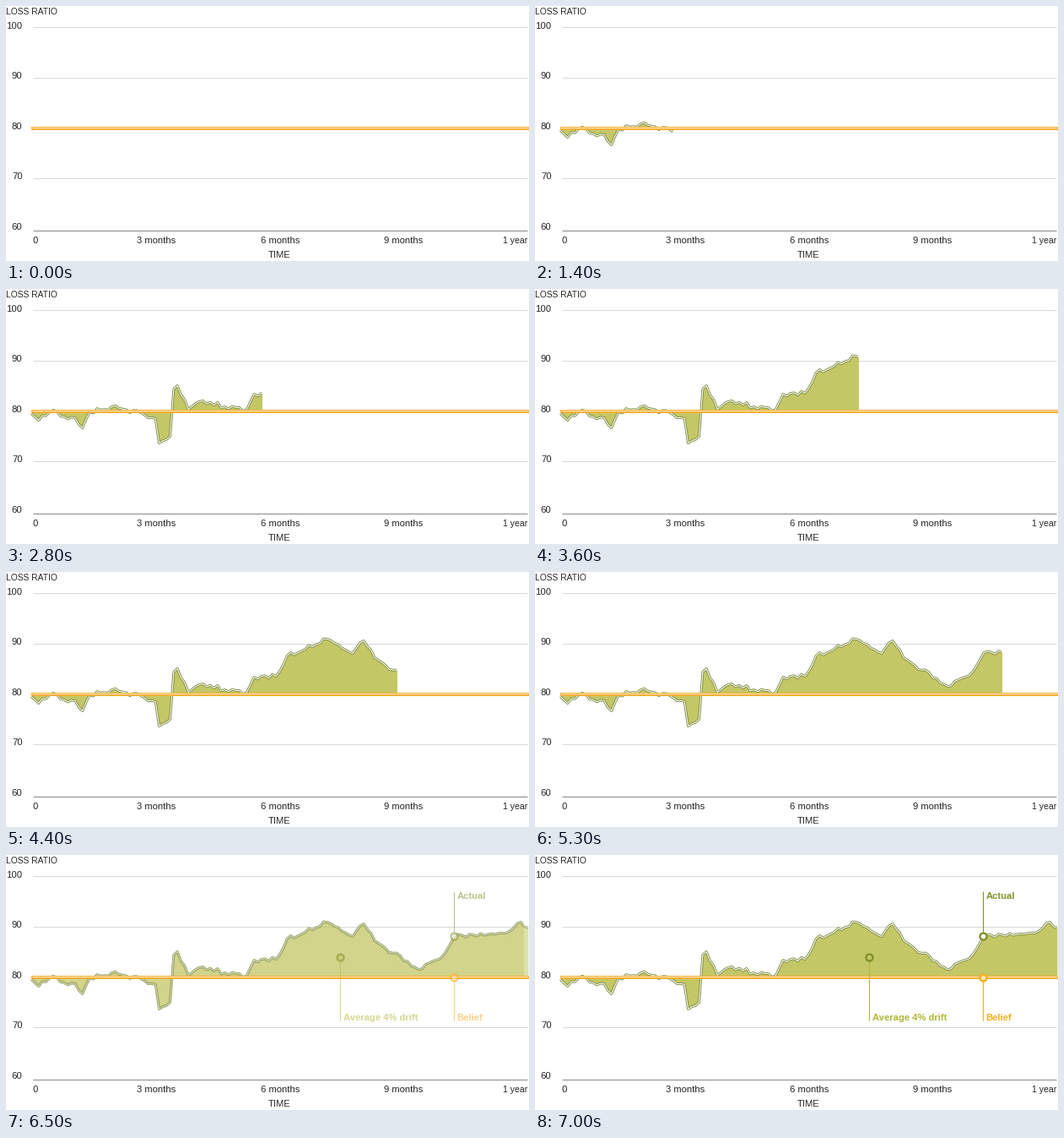
These frames come from a looping animation (620x302 px, 8 s). A matplotlib script:

```python
import numpy as np
import matplotlib.pyplot as plt
from matplotlib.animation import FuncAnimation
from matplotlib.patches import Rectangle

W, H, DPI = 620, 302, 100
PT = 72 / DPI  # points per pixel
FRAMES, STEP_MS = 80, 100
SWEEP_END, FADE_END = 59, 70
BASE_Y = 145

INK, GRID, AXIS = "#262626", "#d9d9d9", "#999999"
FILL, OUTLINE = "#c4c765", "#7a8838"
OLIVE, LIME, ORANGE = "#82922b", "#b1b837", "#f9ac1f"
GOLD, PALE = "#f6b03a", "#fde6b8"

# Main turns of the curve as (sample, height); seeded jitter roughens the rest
SAMPLES = 137
TURNS = [
    (0, 147), (2, 155), (6, 143), (8, 150), (12, 152), (14, 164), (16, 145),
    (22, 139), (30, 146), (34, 153), (35, 182), (38, 174), (39, 118),
    (40, 114), (43, 142), (47, 132), (53, 139), (59, 142), (61, 124),
    (67, 123), (70, 99), (74, 93), (81, 79), (88, 96), (91, 81), (94, 101),
    (106, 135), (112, 122), (116, 95), (129, 92), (134, 79), (136, 86),
]


def make_curve():
    rng = np.random.default_rng(4)
    turn_at, turn_y = np.transpose(TURNS)
    k = np.arange(SAMPLES)
    jitter = rng.uniform(-3, 3, SAMPLES)
    jitter[turn_at] = 0
    return 30 + 4.33 * k, np.interp(k, turn_at, turn_y) + jitter + 0.5


CURVE_X, CURVE_Y = make_curve()

plt.rcParams["font.family"] = "Liberation Sans"
fig = plt.figure(figsize=(W / DPI, H / DPI), dpi=DPI, facecolor="white")
ax = fig.add_axes([0, 0, 1, 1])
ax.set_xlim(0, W)
ax.set_ylim(H, 0)
ax.axis("off")


def line(xs, ys, color, width, z):
    return ax.plot(xs, ys, color=color, lw=width * PT, zorder=z,
                   solid_capstyle="butt")[0]


def label(x, y, text, size=11.2, color=INK, ha="left", weight="normal"):
    return ax.text(x, y, text, fontsize=size * PT, color=color, ha=ha,
                   va="baseline", weight=weight, zorder=8)


def draw_axes():
    label(0.5, 10, "LOSS RATIO", 10.2)
    for i in range(5):
        label(19.6, 26.6 + 59.6 * i, str(100 - 10 * i), ha="right")
        if i < 4:
            y = 25 + 59.7 * i
            line([32, 618], [y, y], GRID, 1, 1)
    line([32, 618], [266, 266], AXIS, 1.3, 1)
    label(32, 281, "0")
    for i in range(3):
        label(155 + 146.7 * i, 281, f"{3 * (i + 1)} months", 11.3)
    label(618.8, 281, "1 year", 10.5, ha="right")
    label(311, 298, "TIME")


def draw_belief():
    line([30, 620], [BASE_Y, BASE_Y], GOLD, 4, 5)
    line([31, 619], [BASE_Y - 1, BASE_Y - 1], PALE, 1, 5)


def draw_curve():
    area = ax.fill_between(CURVE_X, CURVE_Y, BASE_Y, color=FILL, lw=0, zorder=3)
    return [area,
            line(CURVE_X, CURVE_Y, OUTLINE, 2.9, 4),
            line(CURVE_X, CURVE_Y, "white", 1.1, 4)]


def draw_callout(x, dot_y, y0, y1, color, ring, face, text, text_y):
    dot = ax.plot([x], [dot_y], "o", ms=8 * PT, mfc=face, mec=ring,
                  mew=2.4 * PT, zorder=7)[0]
    return [line([x, x], [y0, y1], color, 1.1, 6), dot,
            label(x + 3.5, text_y, text, 11.3, color, weight="bold")]


def reveal(artists, width):
    box = Rectangle((0, H), width, -H, transform=ax.transData)
    for artist in artists:
        artist.set_clip_path(box)


def show(artists, alpha):
    for artist in artists:
        artist.set_visible(alpha > 0)
        artist.set_alpha(alpha)


draw_axes()
draw_belief()
sweep = draw_curve()
final = (
    draw_curve()
    + draw_callout(531, 95.5, 43, 91, OLIVE, OLIVE, "white", "Actual", 52)
    + draw_callout(396, 121, 125, 196, LIME, OLIVE, FILL,
                   "Average 4% drift", 196)
    + draw_callout(531, BASE_Y, 149, 196, ORANGE, ORANGE, PALE, "Belief", 196))


def update(n):
    # The swept curve cross-dissolves into the finished, labelled one
    fade = np.clip((n - SWEEP_END) / (FADE_END - SWEEP_END), 0, 1)
    reveal(sweep, 23 + 10 * np.clip(n, 2, SWEEP_END))
    show(sweep, 1 - fade if n > 0 else 0)
    show(final, fade)
    return sweep + final


anim = FuncAnimation(fig, update, frames=FRAMES, interval=STEP_MS, repeat=True)
plt.show()
```
